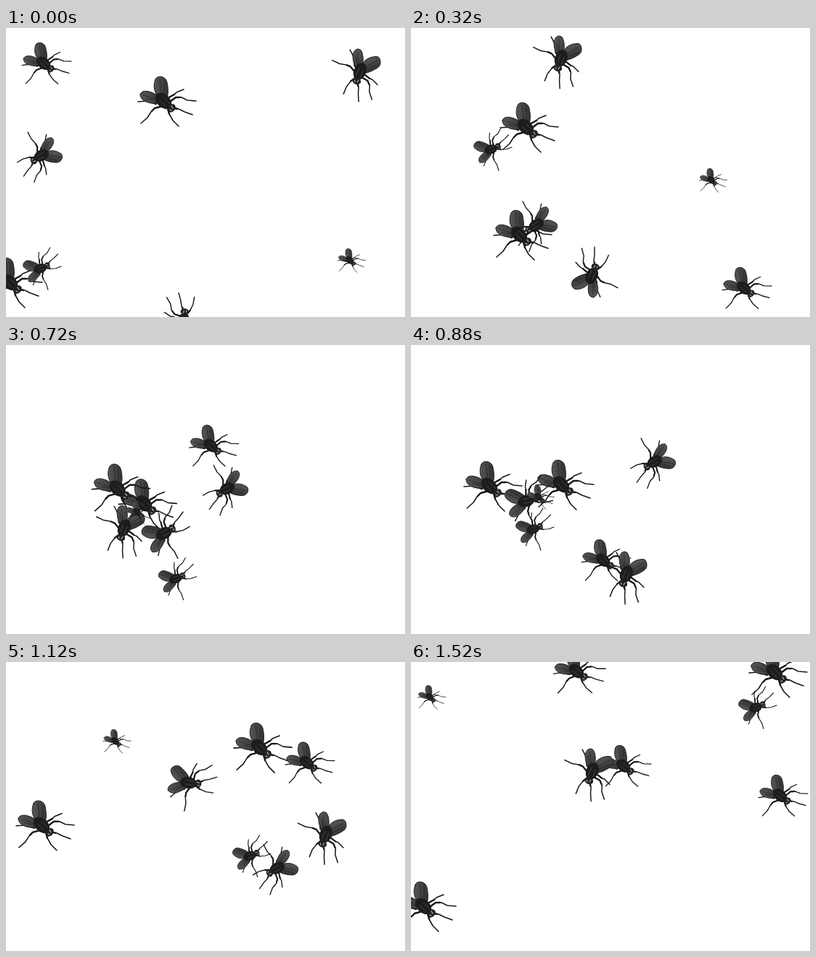
Animation of 550 by 400 pixels, one loop 1600 ms. Source, as an HTML page:

```html
<!DOCTYPE html>
<html lang="en">
<head>
<meta charset="utf-8">
<title>Flies</title>
<style>
  html, body { margin: 0; width: 100%; height: 100%; overflow: hidden; background: #fff; }
  svg { display: block; width: 550px; height: 400px; }
</style>
</head>
<body>
<svg id="stage" viewBox="0 0 550 400">
  <defs>
    <linearGradient id="wing">
      <stop offset="0" stop-color="#565656"/>
      <stop offset="1" stop-color="#333"/>
    </linearGradient>
    <g id="fly" stroke-linecap="round" stroke-linejoin="round">
      <g fill="none" stroke="#181818" stroke-width="1.6">
        <path d="M8-3 17-8 20-11 30-15"/>
        <path d="M11 2 19-4 27-4 35 0 47 1"/>
        <path d="M13 10 23 12 31 16 42 20"/>
        <path d="M8 11 10 19 15 28 23 36"/>
        <path d="M1 8-10 11-15 16-20 24-29 32"/>
        <path d="M-8 5-19 1-33 2"/>
      </g>
      <g fill="none" stroke="#181818" stroke-width="2.4">
        <path d="M8-3 17-8M11 2 19-4 25-4M13 10 21 12M8 11 10 19M1 8-10 11-14 15M-8 5-17 2"/>
      </g>
      <g fill="url(#wing)" stroke="#222" stroke-width="1">
        <path d="M-30-8C-28-16-14-13-4-5L2 2C-6 7-30 5-30-8Z"/>
        <path d="M-9-29C-7-35 5-34 7-25C9-15 9-8 6 1L-5-5C-12-12-12-22-9-29Z"/>
      </g>
      <path fill="none" stroke="#222" stroke-width=".7" d="M-26-7-4 0M-22-2-4 1M-3-29 0-4M3-26 3-4"/>
      <ellipse rx="13" ry="9" transform="translate(2 1) rotate(45)" fill="#1d1d1d"/>
      <path fill="none" stroke="#4a4a4a" stroke-width=".9" d="M-3 0 5 8M2-4 10 4"/>
      <ellipse rx="5" ry="6.5" transform="translate(13 11) rotate(45)" fill="#222"/>
      <path fill="none" stroke="#bbb" stroke-width="1.2" d="M13 8 15 11M11 13 13 14"/>
    </g>
  </defs>
</svg>
<script>
  const STEP = 80, STEPS = 20;
  const times = [0, 4, 7, 11, 13, 16, 19];

  // size, heading (one value or one per key time), path through the key times
  const flies = [
    [1, [0], [[3, 351], [147, 285], [183, 237], [205, 192], [301, 110], [430, 141], [499, 13]]],
    [1, [0], [[215, 100], [156, 136], [181, 192], [106, 194], [41, 187], [72, 313], [15, 337]]],
    [.85, [-4], [[50, 48], [457, 359], [347, 8], [263, 297], [475, 123], [223, 214], [291, 143]]],
    [.94, [67], [[488, 58], [207, 40], [76, 168], [297, 315], [435, 289], [397, 130], [250, 149]]],
    [.85, [105, 105, 105, 105, 105, 105, -4],
      [[50, 175], [174, 271], [265, 260], [337, 160], [344, 317], [449, 167], [507, 184]]],
    [.9, [-125, -110, -88, -60, -45, -20, -5],
      [[245, 408], [249, 345], [281, 307], [157, 217], [234, 192], [258, 109], [226, 12]]],
    [.71, [-65], [[46, 334], [109, 169], [291, 360], [167, 256], [298, 236], [389, 319], [474, 64]]],
    [.48, [0], [[473, 321], [413, 210], [210, 237], [175, 210], [158, 148], [124, 41], [25, 48]]]
  ];

  const stage = document.getElementById('stage');
  const nodes = flies.map(() => {
    const use = document.createElementNS(stage.namespaceURI, 'use');
    use.setAttribute('href', '#fly');
    return stage.appendChild(use);
  });

  function slope(v, i) {
    const a = Math.max(i - 1, 0), b = Math.min(i + 1, v.length - 1);
    return (v[b] - v[a]) / (times[b] - times[a]);
  }

  function segment(t) {
    let i = 0;
    while (i < times.length - 2 && t >= times[i + 1]) i++;
    const span = times[i + 1] - times[i];
    return { i, span, u: (t - times[i]) / span };
  }

  // cubic Hermite curve through the key values
  function curve(v, { i, span, u }) {
    const w = 1 - u;
    return v[i] * (1 + 2 * u) * w * w + v[i + 1] * u * u * (3 - 2 * u)
      + span * u * w * (slope(v, i) * w - slope(v, i + 1) * u);
  }

  function turn(v, { i, u }) {
    return v.length === 1 ? v[0] : v[i] + (v[i + 1] - v[i]) * u;
  }

  function draw(step) {
    const seg = segment(step);
    flies.forEach(([size, heading, path], n) => {
      const x = curve(path.map(p => p[0]), seg);
      const y = curve(path.map(p => p[1]), seg);
      nodes[n].setAttribute('transform',
        `translate(${x.toFixed(1)} ${y.toFixed(1)}) rotate(${turn(heading, seg).toFixed(1)}) scale(${size})`);
    });
  }

  const start = performance.now();
  function tick() {
    draw(Math.floor((performance.now() - start) / STEP) % STEPS);
    requestAnimationFrame(tick);
  }
  tick();
</script>
</body>
</html>
```
